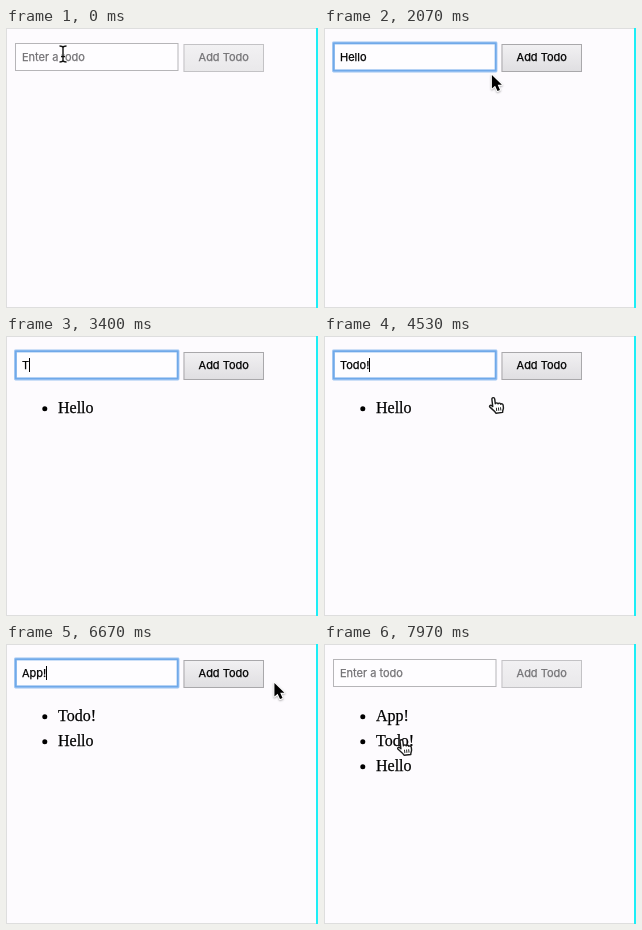
Recreate the animation shown at these times as an HTML page with a canvas. Size 312 by 280 pixels, loop 8000 ms.

```html
<!DOCTYPE html>
<html lang="en">
<head>
<meta charset="utf-8">
<title>Todo list</title>
<style>
html, body { margin: 0; width: 312px; height: 280px; overflow: hidden; background: #fdfbfe; }
canvas { display: block; }
</style>
</head>
<body>
<canvas id="stage" width="312" height="280"></canvas>
<script>
const ctx = document.getElementById('stage').getContext('2d');
const LOOP = 8000, RING_TIME = 170, BLINK = 500;
const REACH_TIME = 600, PRESS_DELAY = 460, ADD_DELAY = 540;
const UI_FONT = '11px Inter, sans-serif';
const LIST_FONT = '16px "Liberation Serif", serif';

// Each round: go to the field, type, then swing along a curve to the button.
const rounds = [
  { text: 'Hello', leave: 0, arrive: 340, field: [57, 26], type: [900, 1470],
    move: 1930, bend: [185, 71], button: [213, 22] },
  { text: 'Todo!', leave: 2770, arrive: 3130, field: [92, 26], type: [3330, 4130],
    move: 4400, bend: [177, 98], button: [220, 26] },
  { text: 'App!', leave: 5230, arrive: 5470, field: [88.5, 24], type: [5870, 6200],
    move: 6430, bend: [368, 55], button: [227.5, 31.5] }
];
const finish = { leave: 7270, arrive: 7970, field: [77.5, 96] };

const arrow = new Path2D('M0 0V13.5L3.2 10.6 5.6 16 8.1 14.9 5.8 9.7H10Z');
const hand = new Path2D('M4 2.2C4-.2 7-.2 7 2.2V7C7.6 5.9 9.8 6 9.9 7.4 10.8 6.4 12.5 6.8 12.6 8.2 ' +
  '13.5 7.5 15 8 15 9.5V12C15 14 13.6 14.8 13.6 17H6.5C6 15 3.6 13 .9 9.9 0 8.5 1.8 7.3 3 8.5L4 9.7Z');
const folds = new Path2D('M7.6 11.3V14.8M9.8 11.3V14.8M12 11.3V14.8');
const beam = new Path2D('M-3.5-8Q-.5-8 0-6.5Q.5-8 3.5-8M0-6.5V6.5M-3.5 8Q-.5 8 0 6.5Q.5 8 3.5 8M-2 2.5H2');

const clamp = u => Math.max(0, Math.min(1, u));
const easeOut = u => 1 - (1 - u) ** 3;
const easeInOut = u => u * u * (3 - 2 * u);
const mix = (a, b, u) => a.map((v, i) => v + (b[i] - v) * u);
const curve = (a, b, c, u) => mix(mix(a, b, u), mix(b, c, u), u);

function pointerAt(t) {
  const stops = [...rounds, finish];
  const i = stops.findLastIndex(s => t >= s.leave);
  const { leave, arrive, field, move, bend, button } = stops[i];
  if (t >= move) return curve(field, bend, button, easeOut(clamp((t - move) / REACH_TIME)));
  const from = i ? stops[i - 1].button : field;
  return mix(from, field, easeInOut(clamp((t - leave) / (arrive - leave))));
}

function typedCount({ text, type: [first, last] }, t) {
  if (t < first) return 0;
  const gap = (last - first) / (text.length - 1);
  return Math.min(text.length, 1 + Math.floor((t - first) / gap));
}

// A hairline outline gives the text the soft, heavy look of the page.
function write(text, x, y, font, color) {
  ctx.font = font;
  ctx.fillStyle = ctx.strokeStyle = color;
  ctx.lineWidth = 0.25;
  ctx.fillText(text, x, y);
  ctx.strokeText(text, x, y);
}

function frameRect(x, y, w, h, color, width = 1) {
  ctx.strokeStyle = color;
  ctx.lineWidth = width;
  ctx.strokeRect(x, y, w, h);
}

function drawPage() {
  ctx.fillStyle = '#fdfbfe';
  ctx.fillRect(0, 0, 312, 280);
  ctx.fillStyle = '#dedede';
  ctx.fillRect(0, 0, 310, 1);
  ctx.fillRect(0, 0, 1, 280);
  ctx.fillRect(0, 279, 310, 1);
  ctx.fillStyle = '#1ceef6';
  ctx.fillRect(310, 0, 2, 280);
}

function drawInput(value, ring, caret) {
  ctx.fillStyle = '#fefdff';
  ctx.fillRect(9, 15, 163, 28);
  frameRect(9.5, 15.5, 162.5, 27, '#b6b5b8');
  if (ring > 0) {
    ctx.save();
    ctx.globalAlpha = ring;
    ctx.lineJoin = 'round';
    frameRect(9.5, 15, 162.5, 28, '#9cc4f2', 2.8);
    frameRect(9.7, 15.3, 162, 27.3, '#70a9e9', 1.5);
    ctx.restore();
  }
  write(value || 'Enter a todo', 16, 33, UI_FONT, value ? '#000' : '#747376');
  if (caret) {
    ctx.fillStyle = '#000';
    ctx.fillRect(Math.round(16 + (value ? ctx.measureText(value).width : 0)), 22, 1, 14);
  }
}

function drawButton(enabled, pressed) {
  const fill = ctx.createLinearGradient(0, 16, 0, 44);
  fill.addColorStop(0, pressed ? '#dcdbde' : '#f2f1f3');
  fill.addColorStop(1, pressed ? '#d2d1d4' : enabled ? '#dfdee1' : '#e9e8ea');
  ctx.fillStyle = fill;
  ctx.fillRect(177.5, 16, 80.5, 28);
  frameRect(178, 16.5, 79.5, 27, enabled ? '#a9a8ab' : '#c3c2c5');
  ctx.textAlign = 'center';
  write('Add Todo', 217.7, 33, UI_FONT, enabled ? '#000' : '#747376');
  ctx.textAlign = 'left';
}

function drawList(items) {
  items.forEach((text, i) => {
    const y = 77 + 25 * i;
    write(text, 52, y, LIST_FONT, '#000');
    ctx.beginPath();
    ctx.arc(38.8, y - 4.3, 2.5, 0, Math.PI * 2);
    ctx.fill();
  });
}

function drawHand() {
  ctx.rotate(-0.12);
  ctx.scale(0.95, 0.95);
  ctx.translate(-5.7, -0.7);
  ctx.fillStyle = '#fff';
  ctx.fill(hand);
  ctx.strokeStyle = '#1c1c1c';
  ctx.lineWidth = 1.5;
  ctx.stroke(hand);
  ctx.lineWidth = 1;
  ctx.stroke(folds);
}

function drawBeam() {
  ctx.strokeStyle = '#fff';
  ctx.lineWidth = 3;
  ctx.stroke(beam);
  ctx.strokeStyle = '#111';
  ctx.lineWidth = 1.4;
  ctx.stroke(beam);
}

function drawArrow() {
  ctx.save();
  ctx.shadowColor = 'rgba(0,0,0,.3)';
  ctx.shadowBlur = 2;
  ctx.shadowOffsetY = 1;
  ctx.strokeStyle = '#fff';
  ctx.lineWidth = 2;
  ctx.stroke(arrow);
  ctx.restore();
  ctx.fillStyle = '#000';
  ctx.fill(arrow);
}

function drawPointer([x, y], count) {
  const inRow = y > 14 && y < 45;
  const overInput = inRow && x > 8 && x < 174;
  const overButton = inRow && x > 177 && x < 259;
  const overItem = x > 45 && y > 60 && y < 60 + 25 * count;
  ctx.save();
  ctx.translate(x, y);
  ctx.lineJoin = 'round';
  if (overInput) drawBeam();
  else if (overButton || overItem) drawHand();
  else drawArrow();
  ctx.restore();
}

function draw(t) {
  const items = rounds.filter(r => t >= r.move + ADD_DELAY).map(r => r.text).reverse();
  const round = rounds.find(r => t >= r.arrive - RING_TIME && t < r.move + ADD_DELAY);
  let value = '', ring = 0, caret = false, pressed = false, hidden = false;
  if (round) {
    value = round.text.slice(0, typedCount(round, t));
    pressed = t >= round.move + PRESS_DELAY;
    hidden = value !== '' && t < round.move;
    if (!pressed) {
      const idle = Math.max(0, t - round.type[1]);
      ring = clamp((t - round.arrive + RING_TIME) / RING_TIME);
      caret = Math.floor(idle / BLINK) % 2 === 0;
    }
  }
  drawPage();
  drawInput(value, ring, caret);
  drawButton(value !== '', pressed);
  drawList(items);
  if (!hidden) drawPointer(pointerAt(t), items.length);
}

const start = performance.now();
function tick() {
  draw((performance.now() - start) % LOOP);
  requestAnimationFrame(tick);
}
tick();
</script>
</body>
</html>
```
